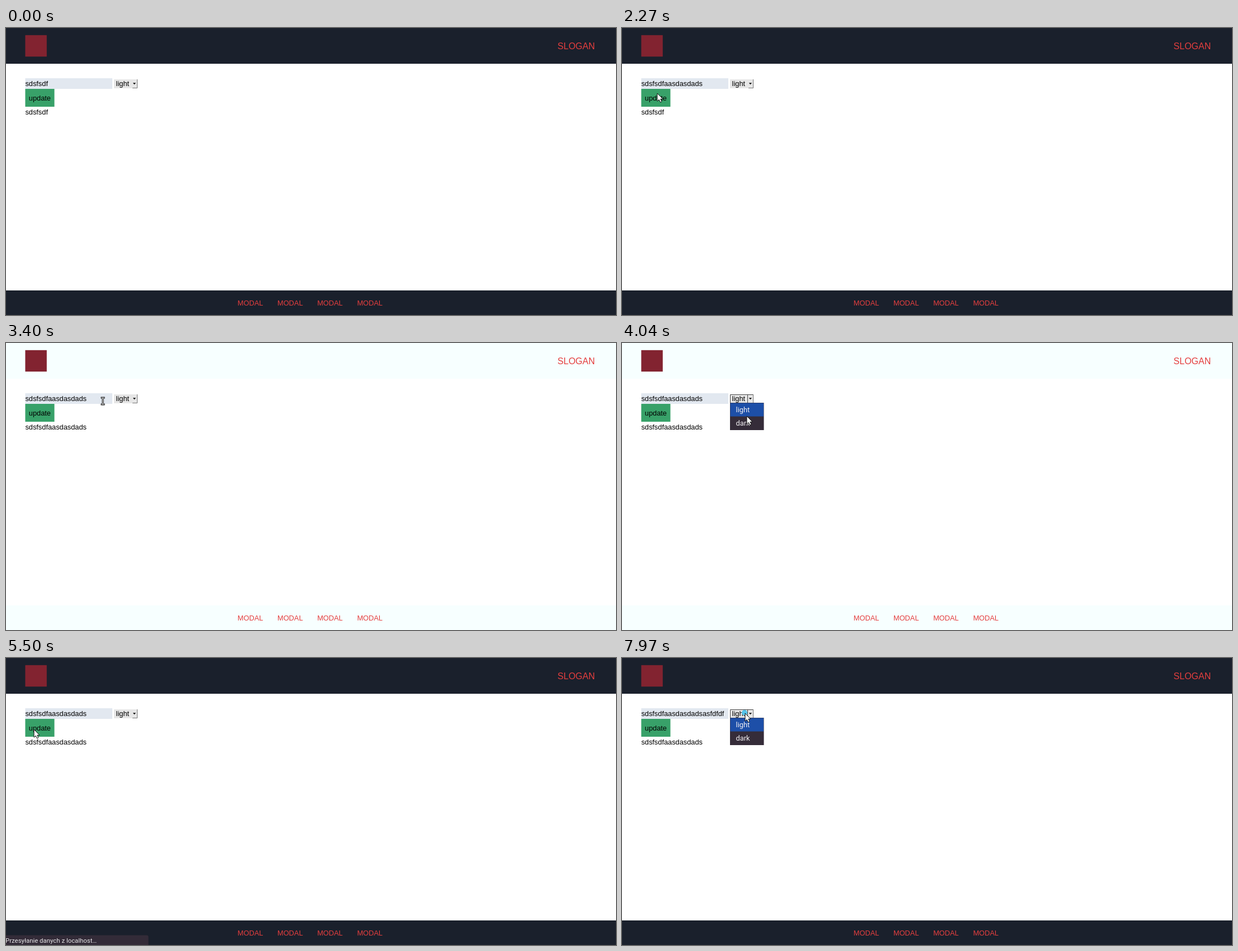
An HTML page that plays this animation: 1090 by 514 pixels, repeating every 8 s.

```html
<!DOCTYPE html>
<html lang="en">
<head>
<meta charset="utf-8">
<title>Theme settings</title>
<style>
  html, body { margin: 0; width: 100%; height: 100%; overflow: hidden; background: #fff; }
  svg { display: block; width: 1090px; height: 514px; }
  text { font: 12.8px "Liberation Sans", Arial, sans-serif; white-space: pre; }
  .brand { fill: #e53e3e; }
  .slogan { font-size: 16px; }
  .system { font-family: Roboto, sans-serif; fill: #f2f0f3; }
  .status { font-size: 11.4px; }
</style>
</head>
<body>
<svg viewBox="0 0 1090 514">
  <defs>
    <path id="beamShape" d="M-2 -6H-1Q0 -6 0 -5V5Q0 6 -1 6H-2M2 -6H1Q0 -6 0 -5M0 5Q0 6 1 6H2"/>
  </defs>
  <g id="bars">
    <rect width="1090" height="64"/>
    <rect y="470" width="1090" height="44"/>
  </g>
  <rect x="34.4" y="12.8" width="38.4" height="38.4" fill="#822330"/>
  <g class="brand">
    <text class="slogan" x="985.6" y="38">SLOGAN</text>
    <text x="413.8" y="497">MODAL</text>
    <text x="485" y="497">MODAL</text>
    <text x="556.2" y="497">MODAL</text>
    <text x="627.4" y="497">MODAL</text>
  </g>

  <rect x="34.4" y="90" width="155.6" height="19" fill="#e2e8f0"/>
  <text id="field" x="34.4" y="104"></text>
  <rect id="caret" y="93" width="1" height="14"/>
  <rect x="34.4" y="109" width="52.1" height="32" fill="#38a169"/>
  <text x="40.8" y="130">update</text>
  <text id="result" x="34.4" y="155"></text>

  <rect x="193" y="92" width="42" height="16" fill="#e6e6e6"/>
  <path d="M226 107.5H234.5V92" fill="none" stroke="#777"/>
  <path d="M226.8 98.3h5.2l-2.6 2.9z"/>
  <path id="focus" d="M193.5 107V92.5H234M224.5 92V107" fill="none" stroke="#444"/>
  <text id="choice" x="196.6" y="104"></text>

  <g id="popup">
    <rect x="193" y="107" width="60.5" height="49" fill="#352c39"/>
    <rect id="hover" x="193.5" width="59.5" height="24" fill="#1d4fa8"/>
    <text class="system" x="203.6" y="124">light</text>
    <text class="system" x="203.6" y="148">dark</text>
  </g>

  <g id="status">
    <path d="M0 496.5H251.5Q254.5 496.5 254.5 499.5V514H0z" fill="#352c39"/>
    <text class="system status" x="-1" y="510">Przesyłanie danych z localhost…</text>
  </g>

  <circle id="ring" fill="#56c4ea"/>
  <g id="cursor">
    <path id="arrow" d="M0 0V14.2L3.2 11.3L5.5 16L8 14.8L5.8 10.2H10z" fill="#fff" stroke="#111"/>
    <g id="beam" fill="none" stroke-linecap="square">
      <use href="#beamShape" stroke="#111" stroke-width="3"/>
      <use href="#beamShape" stroke="#fff"/>
    </g>
  </g>
</svg>
<script>
const LOOP = 8000;
const el = Object.fromEntries([...document.querySelectorAll('[id]')].map(e => [e.id, e]));

const click = {
  field: 500, submitLight: 2110, openList: 3690, pickDark: 4360,
  submitDark: 4910, fieldAgain: 6590, openListAgain: 7920
};
const SERVER_DELAY = 585;
const lightOn = click.submitLight + SERVER_DELAY;
const darkOn = click.submitDark + SERVER_DELAY;

const spot = {
  entry: { x: 134, y: 109 }, field: { x: 132, y: 97 }, fieldEnd: { x: 162, y: 108 },
  button: { x: 63, y: 117 }, buttonCorner: { x: 50, y: 128 },
  select: { x: 220, y: 99 }, dark: { x: 224, y: 138 }
};

const BASE = 'sdsfsdf';
const FIRST = 'aasdasdads';
const SECOND = 'asfdfdf';

const within = (t, a, b) => t >= a && t < b;
const clamp = k => Math.max(0, Math.min(1, k));
const smooth = k => k * k * (3 - 2 * k);
const show = (e, on) => { e.style.display = on ? '' : 'none'; };

function write(e, s) {
  if (e.textContent !== s) e.textContent = s;
}

// Letters appear at an even rhythm, the first at start and the last at end.
function typing(t, start, end, s) {
  const count = Math.floor((t - start) / (end - start) * (s.length - 1)) + 1;
  return s.slice(0, Math.max(0, count));
}

function fieldText(t) {
  return BASE
    + typing(t, 930, 1135, FIRST.slice(0, 2)) + typing(t, 1290, 1800, FIRST.slice(2))
    + typing(t, 6830, 6885, SECOND.slice(0, 2)) + typing(t, 7240, 7840, SECOND.slice(2));
}

function pointer(t) {
  let { x, y } = spot.entry;
  const glide = (start, end, to) => {
    const k = smooth(clamp((t - start) / (end - start)));
    x += (to.x - x) * k;
    y += (to.y - y) * k;
  };
  glide(130, 290, spot.field);
  glide(1270, 1800, spot.button);
  glide(2980, 3640, spot.select);
  glide(3790, 4130, spot.dark);
  glide(4410, 4770, spot.buttonCorner);
  glide(5550, 5700, spot.entry);
  glide(5750, 6490, spot.fieldEnd);
  glide(7190, 7580, spot.select);
  return { x: Math.round(x), y: Math.round(y) };
}

function drawRing(t, { x, y }) {
  const start = Object.values(click).find(c => within(t, c, c + 160));
  show(el.ring, start !== undefined);
  if (start === undefined) return;
  const age = t - start;
  el.ring.setAttribute('cx', x - 1);
  el.ring.setAttribute('cy', y - 1);
  el.ring.setAttribute('r', 2 + age * 0.06);
  el.ring.style.opacity = clamp((160 - age) / 60);
}

function drawStatus(t) {
  const sent = t < click.submitDark ? click.submitLight : click.submitDark;
  const age = t - sent;
  show(el.status, within(age, 370, SERVER_DELAY + 120));
  el.status.style.opacity = clamp((SERVER_DELAY + 120 - age) / 120);
}

function draw(t) {
  el.bars.setAttribute('fill', within(t, lightOn, darkOn) ? '#f7ffff' : '#1a202c');
  write(el.field, fieldText(t));
  write(el.result, t < lightOn ? BASE : BASE + FIRST);
  write(el.choice, within(t, click.pickDark + 70, darkOn) ? 'dark' : 'light');

  const listOpen = within(t, click.openList + 40, click.pickDark + 70)
    || t >= click.openListAgain + 40;
  show(el.popup, listOpen);
  show(el.focus, listOpen || within(t, click.pickDark, click.submitDark));

  show(el.caret, within(t, click.field, click.submitLight + 140)
    || within(t, click.fieldAgain, click.openListAgain));
  el.caret.setAttribute('x', Math.round(34.4 + el.field.getComputedTextLength()));

  const at = pointer(t);
  const overField = at.x < 190 && within(at.y, 90, 109.5);
  show(el.cursor, t >= 130);
  show(el.beam, overField);
  show(el.arrow, !overField);
  el.cursor.setAttribute('transform', `translate(${at.x} ${at.y})`);
  el.hover.setAttribute('y', at.y > 132 ? 131.5 : 107.5);

  drawRing(t, at);
  drawStatus(t);
}

const began = performance.now();
function frame() {
  draw((performance.now() - began) % LOOP);
  requestAnimationFrame(frame);
}
frame();
</script>
</body>
</html>
```
